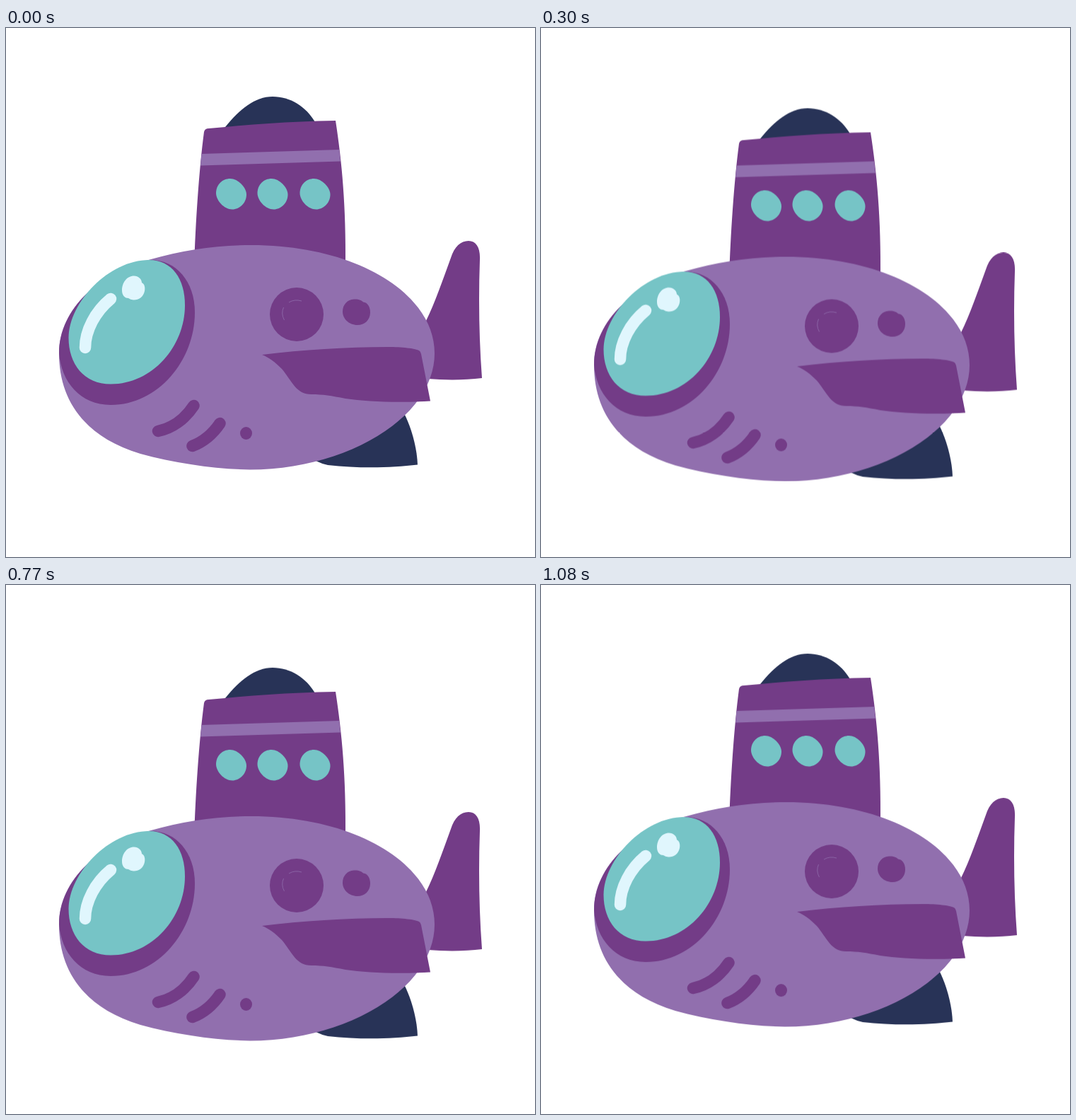
These frames come from a looping animation (748 by 748 pixels, 1.11 s). An HTML page:

```html
<!DOCTYPE html>
<html lang="en">
<head>
<meta charset="utf-8">
<title>Bobbing submarine</title>
<style>
  html, body { margin: 0; width: 100%; height: 100%; overflow: hidden; background: #fff; }
  svg { display: block; width: 100%; height: 100%; }
  .plum { fill: #733c87; }
  .lilac { fill: #916fae; }
  .navy { fill: #283357; }
  .teal { fill: #76c4c6; }
  .shine { fill: #e0f6fd; }
  .line { fill: none; stroke-linecap: round; stroke-width: 16.5px; }
  #sub { animation: bob 1110ms cubic-bezier(.56, 0, .39, 1) -1102ms infinite; }
  @keyframes bob {
    0%, 100% { transform: translateY(0); }
    50% { transform: translateY(27px); }
  }
</style>
</head>
<body>
<svg viewBox="0 0 748 748">
  <defs>
    <path id="port" d="M-1-21.5C10-21.5 22-9 22 1C22 13 12 22 2 22C-10 22-21 9-21-1C-21-13-12-21.5-1-21.5Z"/>
  </defs>
  <g id="sub">
    <!-- tower -->
    <path class="navy" d="M310 140C330 115 352 97 377 97C402 97 424 111 437 133L430 150H315Z"/>
    <path class="plum" d="M266 340C268 275 273 200 280 147Q281 142 287 142C340 137 400 132 466 131C475 190 481 250 480 340Z"/>
    <path class="lilac" d="M276.5 178L471 172L473 188.5L275 194.5Z"/>
    <g class="teal">
      <use href="#port" x="318" y="234.5"/>
      <use href="#port" x="376.5" y="234.5"/>
      <use href="#port" x="436.5" y="234.5"/>
    </g>

    <!-- fins and hull -->
    <path class="plum" d="M580 430L594 414C606 390 618 355 629 325C634 309 643 301 654 301C665 301 671 311 670 328C668 385 669 440 673 495C650 498 620 498 597 496L580 480Z"/>
    <path class="navy" d="M500 560L563 545C573 565 581 592 582 617.5C545 622 500 623 455 618Q446 616 438 612Z"/>
    <path class="lilac" d="M75 460C75 397 133 345 205 327C250 314 300 307 347 307C495 307 606 375 606 460C606 550 482 624.5 345 624.5C300 624 240 616 190 602C110 578 75 525 75 460Z"/>

    <!-- cockpit -->
    <path class="plum" d="M205 328C240 328 267 358 267 402C267 470 215 533 148 533C105 533 78 500 75 460C75 397 133 345 205 328Z"/>
    <path class="teal" d="M202 328C235 328 253 355 253 392C253 450 207 503.5 148 503.5C110 503.5 88.5 475 88.5 438C88.5 388 146 328 202 328Z"/>
    <path class="line" stroke="#e0f6fd" d="M112 452C112 428 126 401 148 383"/>
    <path class="shine" d="M181 350.5C187 350.5 192 355 192 360C196 362 197 367 196 372C194 381 187 385 180 384.5Q176 384 173 382C167 382 164 377 164 371C164 360 171 350.5 181 350.5Z"/>

    <!-- hull details -->
    <g class="plum">
      <circle cx="411" cy="405" r="38"/>
      <path d="M492 383.5C498 383 503 385 505 387.5C511 388 515 394 515 402C515 413 507 420 497 420C485 420 476 411 476 401C476 391 483 384 492 383.5Z"/>
      <path d="M362 462C420 455 480 451 540 451C560 451 578 453 584 456Q586 457 587 461L600 527.5C550 530.5 510 528 480 524C460 520 448 518 432 518C410 518 405 500 390 482C380 472 372 466 362 462Z"/>
      <ellipse cx="339.5" cy="573" rx="8.5" ry="9"/>
    </g>
    <path fill="none" stroke="#916fae" stroke-width=".8" d="M393.5 413Q388.500 404 392.500 395M400 388Q408 383 418 386"/>
    <path class="line" stroke="#733c87" d="M215 570C235 566 253 553 265.500 534M263.500 591C282 584 293 573 302.500 559"/>
  </g>
</svg>
</body>
</html>
```
